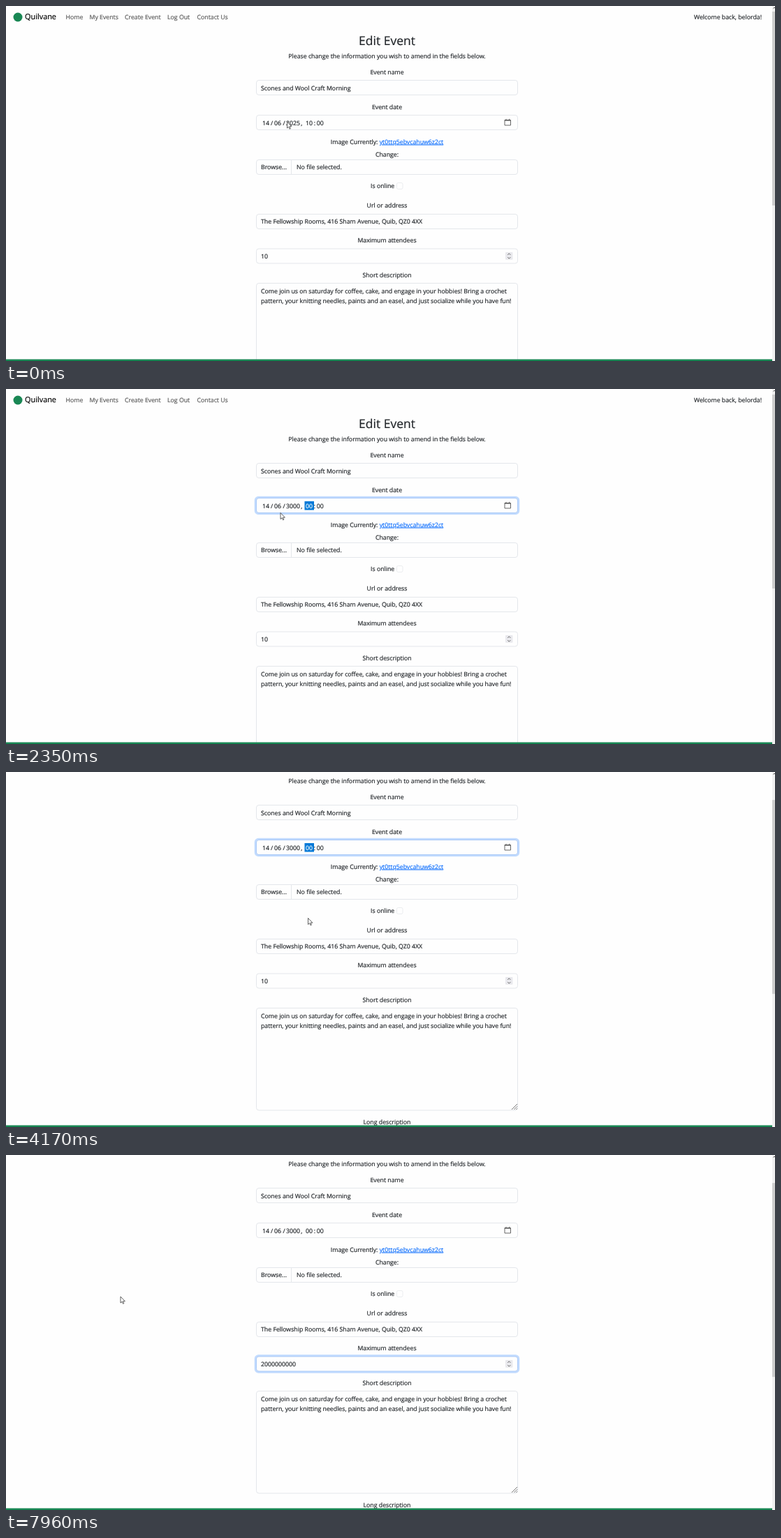
Write an HTML page that moves like this. It is 1101 px wide and 509 px high and loops after 8000 ms.

```html
<!DOCTYPE html>
<html lang="en">
<head>
<meta charset="utf-8">
<title>Edit Event</title>
<style>
  html, body { margin: 0; width: 100%; height: 100%; overflow: hidden; background: #fefefe; }
  svg { display: block; width: 1101px; height: 509px; }
  text { font: 8.75px "Open Sans", "Noto Sans", sans-serif; fill: #212529; stroke: #212529; stroke-width: .18; text-rendering: geometricPrecision; white-space: pre; }
  .mid { text-anchor: middle; }
  .end { text-anchor: end; }
  .nav { fill: #595959; stroke: #595959; }
  .brand { font-size: 10.9px; fill: #000; stroke: #000; }
  .title { font-size: 17.5px; }
  .link { fill: #0d6efd; stroke: #0d6efd; text-decoration: underline; }
  .field { fill: #fefefe; stroke: #e4e7eb; stroke-width: 1; }
  .check { fill: #fefefe; stroke: #e9ebee; stroke-width: .9; }
  .mark { fill: #0078d7; }
  .icon { fill: none; stroke: #555; stroke-width: 1; }
</style>
</head>
<body>
<svg id="stage" viewBox="0 0 1101 509">
  <g id="page"></g>
  <path d="M0 507.8H1097" stroke="#198754" stroke-width="2.5"/>
  <path d="M1097 0h4v509h-4z" fill="#f0f0f0"/>
  <path d="M1098.5 3.5l1.5-1.5 1.5 1.5" class="icon"/>
  <rect id="thumb" x="1097" width="4" height="278" fill="#cdcdcd"/>
  <path id="arrow" d="M.5 .5V9.6L2.6 7.7 4 10.8 5.4 10.2 4 7.2H6.9Z" fill="#fefefe" stroke="#222" stroke-width=".7"/>
  <path id="beam" d="M-2-4.8H-.6L0-4.3.6-4.8H2M0-4.3V4.3M-2 4.8H-.6L0 4.3.6 4.8H2" class="icon"/>
</svg>
<script>
const $ = id => document.getElementById(id);
const page = $('page');

function add(tag, attrs, content = '') {
  const el = document.createElementNS('http://www.w3.org/2000/svg', tag);
  for (const key in attrs) el.setAttribute(key, attrs[key]);
  el.textContent = content;
  return page.appendChild(el);
}
// y is the middle of the capitals
const write = (x, y, content, cls = '') => add('text', { x, y: y + 3.1, class: cls }, content);
const label = (y, content) => write(545.5, y, content, 'mid');
const box = (x, y, width, height, cls, rx = 0) => add('rect', { x, y, width, height, rx, class: cls });
const field = (y, height = 21) => box(358.5, y, 374, height, 'field', 3.5);
const icon = (d, width = 1) => add('path', { d, class: 'icon', style: `stroke-width:${width}` });
function glow(y) {
  const ring = add('g', {});
  ring.append(
    add('rect', { x: 357, y: y - 1.5, width: 377, height: 24, rx: 4.5, fill: 'none', stroke: '#c2dbfe', 'stroke-width': 2.6 }),
    add('rect', { x: 358.4, y: y - .1, width: 374.2, height: 21.2, rx: 3.5, fill: 'none', stroke: '#86b7fe', 'stroke-width': .6 }));
  return ring;
}

add('circle', { cx: 17, cy: 16, r: 6.5, fill: '#198754' });
write(27, 15.8, 'Quilvane', 'brand');
[[85.5, 'Home'], [119.5, 'My Events'], [170, 'Create Event'], [231, 'Log Out'], [273.5, 'Contact Us']]
  .forEach(([x, name]) => write(x, 16, name, 'nav'));
write(1082, 16, 'Welcome back, belorda!', 'end');

write(545.5, 52.7, 'Edit Event', 'mid title');
label(71.5, 'Please change the information you wish to amend in the fields below.');

label(95, 'Event name');
field(106.5);
write(365, 117.5, 'Scones and Wool Craft Morning');

label(144.5, 'Event date');
field(156.5);
const dateGlow = glow(156.5);
const yearMark = box(400, 161, 23, 12.5, 'mark');
const hourMark = box(427.5, 161, 13.5, 12.5, 'mark');
[[367, '14'], [379, '/'], [384, '06'], [396.5, '/'], [422.3, ','], [440.8, ':'], [444.7, '00']]
  .forEach(([x, part]) => write(x, 167.5, part));
const year = write(401, 167.5, '');
const hour = write(429, 167.5, '');
icon('M714 163.5h8.5v7.5h-8.5zM714 164.2h8.5M716 161.8v1.5M720.5 161.8v1.5', .9);

label(194.5, 'Image Currently: ').append(add('tspan', { class: 'link' }, 'yt0ttq5ebvcahuw6z2ct'));
label(213, 'Change:');
field(220.5);
icon('M408.5 221v20').style.stroke = '#e4e7eb';
write(365, 231, 'Browse...');
write(416, 231, 'No file selected.');

write(522, 258.3, 'Is online');
box(559.5, 253.5, 8.5, 9, 'check', 2);

label(286, 'Url or address');
field(298.5);
write(365, 308.8, 'The Fellowship Rooms, 416 Sham Avenue, Quib, QZ0 4XX');

label(336, 'Maximum attendees');
field(348);
const countGlow = glow(348);
const countMark = box(365, 352, 11, 12.5, 'mark');
const count = write(365, 358.5, '');
const caret = add('rect', { y: 352.5, width: .8, height: 11.5, fill: '#212529' });
add('rect', { x: 715, y: 353, width: 10.5, height: 10.8, rx: 1, fill: '#e9e9ed' });
icon('M718.3 356.8l2-2 2 2M718.3 360.2l2 2 2-2', .9);

label(385.5, 'Short description');
field(397.5, 146.5);
write(365, 408.5, 'Come join us on saturday for coffee, cake, and engage in your hobbies! Bring a crochet');
write(365, 422.5, 'pattern, your knitting needles, paints and an easel, and just socialize while you have fun!');
icon('M724 543l8-8M727.3 543l4.7-4.7M730.3 543l1.7-1.7', .8);
label(560.5, 'Long description');

// Tracks: [start time, value...], each value held until the next
const at = (track, t) => track.findLast(step => step[0] <= t).slice(1);
const pointer = [
  [0, 402, 165.5], [280, 403, 166], [400, 404.5, 167], [1180, 392.5, 177],
  [3410, 420, 163], [3660, 429, 171], [3780, 437, 180], [3930, 438, 185],
  [4050, 435, 198], [4170, 432, 209], [4290, 433, 222], [4410, 436, 232],
  [4560, 440, 243, 'beam'], [4680, 438, 256, 'beam'], [4800, 430, 268], [4920, 422, 280],
  [5040, 418, 294, 'beam'], [5190, 250, 276, 'beam'], [5310, 53.5, 251, 'beam'],
  [5710, 0, 0, 'none'], [7680, 124, 144], [7960, 163.5, 202.5]];
const scroll = [[0, 0], [4050, 30], [4170, 59]];
const years = [[0, '2025'], [1710, '0003'], [1990, '0030'], [2110, '0300'], [2230, '3000']];
const dateFocus = [[0, 0], [920, .6], [1040, 1], [5190, .5], [5310, 0]];
const countFocus = [[0, 0], [5190, .5], [5310, .9], [5430, 1]];
const keys = [5710, 6110, 6250, 6370, 6490, 6610, 6740, 6880, 7030, 7160];

const show = (el, on) => el.style.opacity = +on;
function choose(mark, text, on) {
  show(mark, on);
  text.style.fill = text.style.stroke = on ? '#fff' : '';
}

function draw(t) {
  const [offset] = at(scroll, t);
  page.setAttribute('transform', `translate(0 ${-offset})`);
  $('thumb').setAttribute('y', 8 + offset * .545);

  const [x, y, shape = 'arrow'] = at(pointer, t);
  for (const name of ['arrow', 'beam']) {
    show($(name), shape === name);
    $(name).setAttribute('transform', `translate(${x} ${y})`);
  }

  [year.textContent] = at(years, t);
  hour.textContent = t < 2350 ? '10' : '00';
  choose(yearMark, year, t >= 800 && t < 2230);
  choose(hourMark, hour, t >= 2230 && t < 5190);
  show(dateGlow, at(dateFocus, t)[0]);
  show(countGlow, at(countFocus, t)[0]);

  const typed = keys.filter(key => key <= t).length;
  count.textContent = typed ? '2'.padEnd(typed, '0') : '10';
  choose(countMark, count, t >= 5190 && !typed);
  show(caret, typed && t < 7680);
  caret.setAttribute('x', 365 + typed * 5);
}

function tick() {
  draw(performance.now() % 8000);
  requestAnimationFrame(tick);
}
tick();
</script>
</body>
</html>
```
